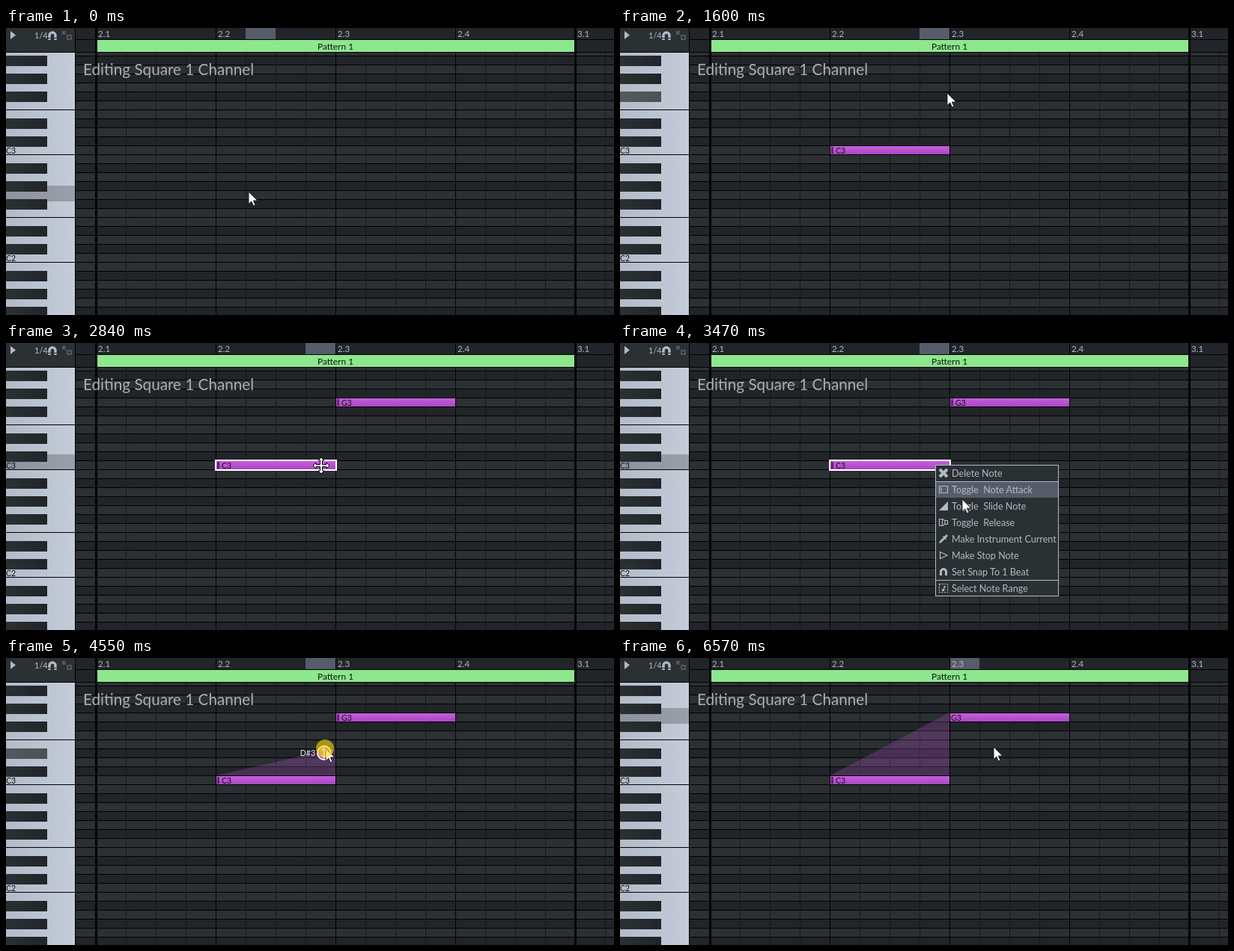
An HTML page that plays this animation: 812x384 px, repeating every 7.35 s.

```html
<!DOCTYPE html>
<html lang="en">
<head>
<meta charset="utf-8">
<title>Piano roll</title>
<style>
html, body { margin: 0; width: 100%; height: 100%; overflow: hidden; background: #212529; }
svg { display: block; font-family: Lato, "Open Sans", sans-serif; }
rect { shape-rendering: crispEdges; }
text { white-space: pre; }
</style>
</head>
<body>
<svg id="stage" width="812" height="384" viewBox="0 0 812 384"></svg>
<script>
const LOOP = 7350;
const LIGHT = '#b2b9c6', DARK = '#212529', PANEL = '#2b3033', ACCENT = '#565c69';
const ROW = 12, TOP_ROW = 25, ROWS = 30;
const NAMES = ['B', 'A#', 'A', 'G#', 'G', 'F#', 'F', 'E', 'D#', 'D', 'C#', 'C'];
const C3 = 157, G3 = 73;

const rect = (x, y, w, h, fill, extra = '') =>
  `<rect x="${x}" y="${y}" width="${w}" height="${h}" fill="${fill}" ${extra}/>`;
const text = (x, y, size, fill, str, extra = '') =>
  `<text x="${x}" y="${y}" font-size="${size}" fill="${fill}" ${extra}>${str}</text>`;
const path = (d, fill, extra = '') => `<path d="${d}" fill="${fill}" ${extra}/>`;
const group = (id, body) => `<g id="${id}">${body}</g>`;
const gradient = (id, from, to, vertical) =>
  `<linearGradient id="${id}" x2="${vertical ? 0 : 1}" y2="${vertical ? 1 : 0}">` +
  `<stop stop-color="${from}"/><stop offset="1" stop-color="${to}"/></linearGradient>`;
const range = n => [...Array(n).keys()];
const rowName = i => NAMES[i % 12];
const rowTop = i => TOP_ROW + i * ROW;
const rowAt = y => Math.floor((y - TOP_ROW) / ROW);
const isBlack = i => rowName(i).length > 1;

// Top and height of the white key for a row
function whiteKey(i) {
  const octave = TOP_ROW + Math.floor(i / 12) * 144;
  const k = 'BAGFEDC'.indexOf(rowName(i));
  return k < 4 ? [octave + k * 21, 21] : [octave + 84 + (k - 4) * 20, 20];
}

function gridLayer() {
  let out = '';
  for (const i of range(ROWS)) {
    out += rect(93, rowTop(i), 719, ROW, isBlack(i) ? DARK : PANEL);
    out += rect(93, rowTop(i), 719, 1, '#000');
  }
  for (let x = 160; x < 812; x += 40) {
    if (x % 160 !== 120) out += rect(x, 33, 1, 351, '#16191b');
  }
  for (const x of [280, 440, 600]) out += rect(x, 33, 1, 351, '#000');
  return out + rect(119, 33, 3, 351, '#000') + rect(759, 33, 3, 351, '#000');
}

function headerLayer() {
  let out = rect(93, 0, 719, 33, DARK) + rect(0, 0, 812, 15, DARK) +
    rect(320, 0, 40, 15, ACCENT, 'id="cell"') + rect(93, 15, 719, 1, '#000') +
    rect(122, 16, 637, 16, '#8de78d') + rect(93, 32, 719, 1, '#000');
  for (const x of [280, 440, 600]) out += rect(x, 0, 1, 15, '#000');
  for (const x of [119, 759]) out += rect(x, 0, 3, 33, '#000');
  ['2.1', '2.2', '2.3', '2.4', '3.1'].forEach((s, i) => {
    out += text(123 + i * 160, 12, 11.5, LIGHT, s);
  });
  out += text(440, 28.5, 11.9, '#10150f', 'Pattern 1', 'text-anchor="middle"');
  out += rect(0, 0, 92, 33, PANEL) + path('M6 4V15L13 9.500Z', LIGHT) +
    text(38, 13.5, 11, LIGHT, '1/4') +
    path('M58 16V10a4 4 0 0 1 8 0V16', 'none', `stroke="${LIGHT}" stroke-width="3.4"`) +
    rect(56, 13, 12, 1, PANEL) +
    path('M80 5H76V9M76 5L80 9M82 10h5v5h-5z', 'none', 'stroke="#5d636c" stroke-width="1.5"');
  return out;
}

function pianoLayer() {
  let out = rect(0, 33, 92, 351, 'url(#ivory)') + rect(0, 0, 92, 20, '#000', 'id="whiteHit" fill-opacity=".22"');
  for (const i of range(ROWS)) {
    if (isBlack(i)) out += rect(0, rowTop(i), 55, 14, 'url(#ebony)');
  }
  out += rect(0, 0, 55, 14, '#fff', 'id="blackHit" fill-opacity=".2"');
  for (const y of [109, 169, 253, 313]) out += rect(0, y, 92, 1, '#000');
  return out + text(0, 168, 10.5, '#111', 'C3') + text(0, 312, 10.5, '#111', 'C2') +
    rect(0, 32, 92, 1, '#000') + rect(92, 0, 1, 384, '#000');
}

const note = (id, x, y, name) => group(id,
  rect(x + 1, y + 1, 159, 11, 'url(#note)') +
  group(id + 'Attack', rect(x + 2, y + 2, 3, 9, '#000', 'fill-opacity=".5"')) +
  text(x + 8, y + 10.7, 10.5, '#1a0d1d', name, `id="${id}Label"`) +
  rect(x, y, 161, 13, 'none', `id="${id}Outline" stroke="#fff" stroke-width="2"`));

const stroke = `stroke="${LIGHT}" stroke-width="1.2"`;
const ITEMS = [
  ['Delete Note', path('M1 1L11 11M11 1L1 11', 'none', `stroke="${LIGHT}" stroke-width="4"`)],
  ['Toggle  Note Attack', path('M.5 1.500h11v9h-11zM3 3v6', 'none', stroke)],
  ['Toggle  Slide Note', path('M0 12H12V0Z', LIGHT)],
  ['Toggle  Release', path('M.5 1.500h4v9h-4zM4.500 1.500L8 3.500v5L4.500 10.500M8 3.500h3.500v5H8', 'none', stroke)],
  ['Make Instrument Current', path('M0 12L1 9L6 4L8 6L3 11ZM5 3L9 7L10 6L9 5L12 2L10 0L7 3L6 2Z', LIGHT)],
  ['Make Stop Note', path('M1.500 1.500L11 6L1.500 10.500Z', 'none', stroke)],
  ['Set Snap To 1 Beat', path('M2.500 11V6a3.500 3.500 0 0 1 7 0V11', 'none', `stroke="${LIGHT}" stroke-width="3"`)],
  ['Select Note Range', path('M.5 .5h11v11h-11z', 'none', `${stroke} stroke-dasharray="2 1.500"`) +
    path('M7 3V8.500M7 3L9 4.500', 'none', stroke) + `<circle cx="5.500" cy="8.500" r="1.700" fill="${LIGHT}"/>`]
];

function menuLayer() {
  let out = rect(0, 0, 165, 176, PANEL) + rect(1, 0, 163, 22, ACCENT, 'id="menuHover"');
  ITEMS.forEach(([label, icon], i) => {
    out += `<g transform="translate(5 ${i * 22 + 5})">${icon}</g>` +
      text(22, i * 22 + 15.5, 12.6, LIGHT, label);
  });
  return out + rect(0, 22, 165, 1, LIGHT) + rect(0, 154, 165, 1, LIGHT) +
    rect(.5, .5, 164, 175, 'none', `stroke="${LIGHT}"`);
}

const MOVE = 'M0-11L4-7H1.500V-1.500H7V-4L11 0L7 4V1.500H1.500V7H4L0 11L-4 7H-1.500V1.500H-7V4L-11 0L-7-4V-1.500H-1.500V-7H-4Z';
const handle = '<circle r="9" fill="#b05ac6" stroke="#fff" stroke-width="1.800"/>' +
  path('M-3-3L0-6L3-3M-3 3L0 6L3 3M0-5V5', 'none', 'stroke="#fff" stroke-width="1.600"');

const stage = document.getElementById('stage');
stage.innerHTML = '<defs>' + gradient('ivory', '#b4bbc8', '#c5ccd9') +
  gradient('ebony', '#2b3033', '#212529') + gradient('note', '#c65fdd', '#a947c1', true) + '</defs>' +
  gridLayer() +
  path('', '#be55d2', 'id="slide" fill-opacity=".25"') +
  note('low', 280, C3, 'C3') + note('high', 440, G3, 'G3') +
  text(103, 63, 20.7, '#a7b0b4', 'Editing Square 1 Channel') +
  group('handle', handle) + text(413, 0, 10.5, '#e4e7ec', '', 'id="target" text-anchor="end"') +
  headerLayer() + pianoLayer() + group('menu', menuLayer()) +
  group('arrow', path('M0 0V16.500L3.800 13L6.500 19L9 18L6.400 12H11.800Z', '#fff', 'stroke="#111" stroke-width=".9"')) +
  group('move', path(MOVE, '#fff', 'stroke="#000" stroke-width="1"')) +
  '<circle id="click" r="12" fill="#ffde00" fill-opacity=".6"/>';

const el = Object.fromEntries([...stage.querySelectorAll('[id]')].map(n => [n.id, n]));
const show = (node, on) => node.setAttribute('visibility', on ? 'visible' : 'hidden');
const place = (node, x, y) => node.setAttribute('transform', `translate(${x} ${y})`);

// Stretches in which the picture moves: start, end, number of steps
const BURSTS = [[70, 790, 10], [870, 1600, 10], [1670, 2050, 6], [2280, 2840, 8], [3000, 3710, 10],
  [3790, 4240, 7], [4470, 5030, 8], [5260, 5570, 5], [5720, 5800, 2], [5950, 6570, 9]];

// Pointer keys: time, x, y
const POINTER = [[0, 324, 219], [790, 395, 163], [870, 403, 165], [1030, 404, 165], [1600, 437, 87],
  [1970, 566, 86], [2280, 566, 86], [2760, 421, 164], [3070, 421, 164], [3473, 457, 209],
  [3630, 462, 216], [3790, 463, 216], [4160, 427, 105], [4390, 426, 104], [4470, 426, 108],
  [4550, 427, 121], [4710, 427, 137], [5030, 426, 80], [5260, 434, 80], [5415, 453, 82],
  [5570, 457, 84], [5870, 457, 84], [6260, 498, 118], [6570, 499, 119]];

const PRESSES = [[870, 1030], [1970, 2280], [3000, 3070], [3550, 3710], [4470, 5260], [5720, 5800], [6340, 6490]];
const MENUS = [{ from: 3070, to: 3710, x: 421, y: 163 }, { from: 5800, to: 6490, x: 458, y: 85 }];

function stepTime(t) {
  const burst = BURSTS.filter(b => t >= b[0]).pop();
  if (!burst) return 0;
  const [start, end, n] = burst, gap = (end - start) / (n - 1);
  return Math.min(end, start + Math.floor((t - start + 15) / gap) * gap);
}

function pointerAt(t) {
  const i = POINTER.findIndex(k => k[0] > t);
  if (i < 0) return POINTER[POINTER.length - 1].slice(1);
  const [t0, x0, y0] = POINTER[i - 1], [t1, x1, y1] = POINTER[i];
  const p = (t - t0) / (t1 - t0), e = p * p * (3 - 2 * p);
  return [x0 + (x1 - x0) * e, y0 + (y1 - y0) * e];
}

function drawHover(x, y) {
  el.cell.setAttribute('x', Math.floor(x / 40) * 40);
  const row = rowAt(y), black = isBlack(row);
  show(el.blackHit, black);
  show(el.whiteHit, !black);
  if (black) {
    el.blackHit.setAttribute('y', rowTop(row));
  } else {
    const [top, height] = whiteKey(row);
    el.whiteHit.setAttribute('y', top);
    el.whiteHit.setAttribute('height', height);
  }
}

function drawSlide(t, y) {
  show(el.slide, t >= 3710);
  const row = t < 4470 ? rowAt(97) : t < 5030 ? rowAt(y) : rowAt(G3);
  const top = rowTop(row), held = t >= 4160 && t < 5260;
  el.slide.setAttribute('d', `M281 157L440 ${top}V157Z`);
  show(el.handle, held);
  place(el.handle, 425, top + 6);
  show(el.target, held && t >= 4470);
  el.target.textContent = rowName(row) + '3';
  el.target.setAttribute('y', top + 10);
}

function render(time) {
  const t = stepTime(time);
  const [x, y] = pointerAt(t);
  const pressed = PRESSES.some(([a, b]) => t >= a && t < b);
  const menu = MENUS.find(m => t >= m.from && t < m.to);

  // Hover stays where the menu was opened until the pointer works on the grid again
  const frozen = t >= 5800 ? MENUS[1] : t >= 3070 && t < 3790 ? MENUS[0] : null;
  const hx = frozen ? frozen.x : x, hy = frozen ? frozen.y - (frozen.y === 85 ? 1 : 0) : y;
  drawHover(hx, hy);
  drawSlide(t, y);

  const drawing = pressed && t < 2280;
  const active = !drawing && (!frozen || menu);
  const over = (nx, ny, since) => active && t >= since && hx >= nx && hx < nx + 160 && hy >= ny && hy < ny + 14;
  const onLow = over(280, C3, 870), onHigh = over(440, G3, 1970);
  show(el.low, t >= 870);
  show(el.high, t >= 1970);
  show(el.lowOutline, onLow);
  show(el.highOutline, onHigh);
  const attack = t < 6490;
  el.highAttack.style.display = attack ? '' : 'none';
  el.highLabel.setAttribute('x', attack ? 448 : 442);

  show(el.menu, !!menu);
  show(el.menuHover, !!menu);
  if (menu) {
    place(el.menu, menu.x, menu.y);
    const item = Math.max(0, Math.floor((y - 4 - menu.y) / 22));
    el.menuHover.setAttribute('y', item * 22);
  }

  const moving = !menu && (onLow || onHigh);
  show(el.move, moving);
  show(el.arrow, !moving);
  place(el.move, x, y);
  place(el.arrow, x, y);
  show(el.click, pressed);
  place(el.click, x - 1, y);
}

const began = performance.now();
function frame() {
  render((performance.now() - began) % LOOP);
  requestAnimationFrame(frame);
}
frame();
</script>
</body>
</html>
```
